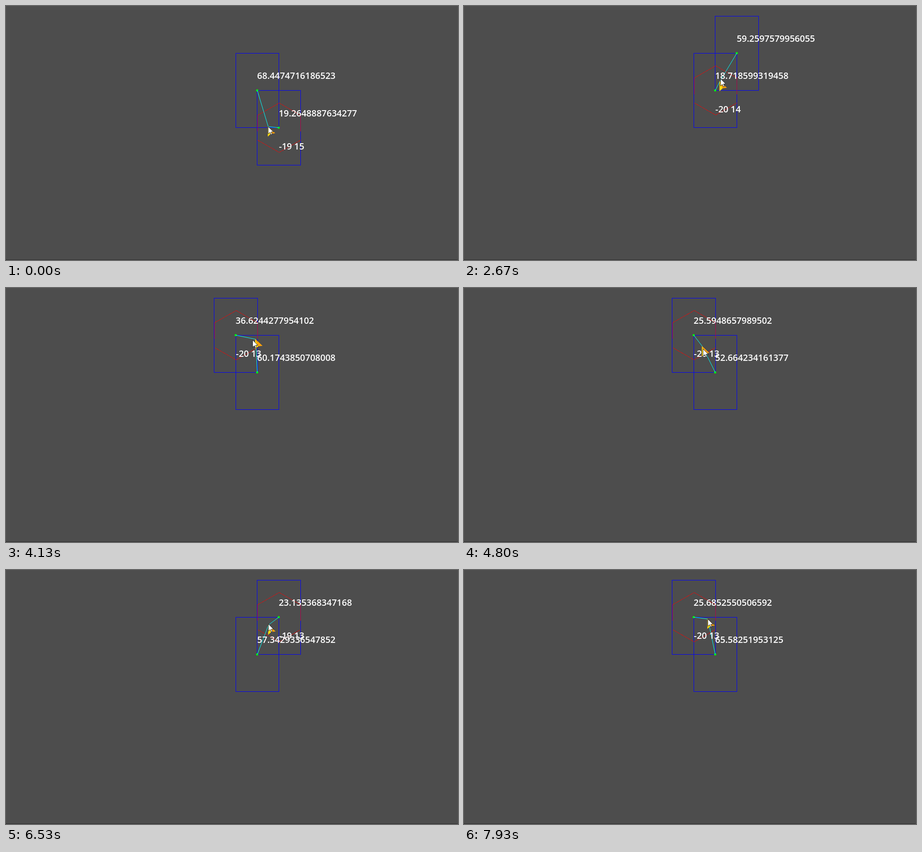
Recreate the animation shown at these times as an HTML page. Size 998 px wide and 561 px high, loop 8 s.

```html
<!DOCTYPE html>
<html lang="en">
<head>
<meta charset="utf-8">
<title>Hex grid picking</title>
<style>
  html, body { margin: 0; width: 100%; height: 100%; overflow: hidden; background: #4d4d4d; }
  svg { display: block; width: 998px; height: 561px; }
  text { font: 600 19.57px "Open Sans", "Noto Sans", sans-serif; fill: #fff; }
  .box, .hex { fill: none; shape-rendering: crispEdges; }
  .box { stroke: #00f; }
  .hex { stroke: #f00; stroke-opacity: .7; }
  .link { fill: none; stroke: #0ff; }
  .dot { fill: #0f0; }
</style>
</head>
<body>
<svg viewBox="0 0 998 561">
  <rect width="998" height="561" fill="#4d4d4d"/>
  <path d="M0 560H998V561H0ZM0 558.5L2 561H0ZM998 558.5L996 561H998Z" fill="#2c2c2c"/>
  <rect class="box"/><rect class="box"/>
  <path class="hex" id="hex"/>
  <circle class="dot" r="2.4"/><circle class="dot" r="2.4"/>
  <path class="link" id="link"/>
  <text class="dist"></text><text class="dist"></text>
  <text id="name"></text>
  <g id="arrow">
    <path d="M-1-1V22L6 15.5Z" fill="#ffd90f"/>
    <path d="M-1-1L15.4 14.6L6 15.5Z" fill="#ffa20a"/>
  </g>
  <path id="cursor" d="M0 0V16L4 12.5L6.4 18L8.8 17L6.5 11.7H11.5Z"
        fill="#fff" stroke="#111" stroke-width=".9"/>
</svg>
<script>
const LOOP = 8000, STEP = 1000 / 15, LAST = 119, LEAD = 2;
const S = 1.2195, R = 45 * S, W = R * Math.sqrt(3), ROW = 1.5 * R;
const OX = 554.82, OY = 186.5;          // centre of cell -20 14

const $ = id => document.getElementById(id);
const all = name => document.querySelectorAll('.' + name);
const boxes = all('box'), dots = all('dot'), dists = all('dist');
const set = (el, attrs) => { for (const a in attrs) el.setAttribute(a, attrs[a]); };
const snap = v => Math.floor(v + .15);

const shift = r => r % 2 ? .5 : 0;
const cell = (c, r) => ({ c, r, x: OX + (c + 20 - shift(r)) * W, y: OY + (r - 14) * ROW });
const mid = cell(-20, 14), low = cell(-19, 15), right = cell(-19, 13), left = cell(-20, 13);

// Point at the given distances from two cells; side picks one of the two solutions
function meet(a, b, da, db, side = 1) {
  const dx = b.x - a.x, dy = b.y - a.y, d = Math.hypot(dx, dy);
  const p = da * S, q = db * S;
  const u = (p * p - q * q + d * d) / (2 * d);
  const h = side * Math.sqrt(Math.max(0, p * p - u * u));
  return { x: a.x + (dx * u - dy * h) / d, y: a.y + (dy * u + dx * h) / d };
}

// Turning points of the pointer, by step
const path = [
  { k: 16, ...meet(mid, low, 68.4474716186523, 19.2648887634277) },
  { k: 25, ...meet(mid, low, 35.3637466430664, 45.059154510498) },
  { k: 40, ...meet(right, mid, 59.2597579956055, 18.718599319458) },
  { k: 52, ...meet(right, mid, 31.9123001098633, 46.0349349975586) },
  { k: 61, x: 554, y: 113 },
  { k: 72, ...meet(left, mid, 25.5948657989502, 52.664234161377, -1) },
  { k: 80, x: 541, y: 151 },
  { k: 98, ...meet(right, mid, 23.135368347168, 57.3429336547852) },
  { k: 107, x: 572, y: 112 },
  { k: 113, x: 556, y: 97 },
  { k: 119, ...meet(left, mid, 25.6852550506592, 65.58251953125, -1) }
];

// Monotone cubic through the turning points
const slope = (a, b, n) => (b[n] - a[n]) / (b.k - a.k);
function tangent(i, n) {
  if (!path[i - 1] || !path[i + 1]) return 0;
  const a = slope(path[i - 1], path[i], n), b = slope(path[i], path[i + 1], n);
  return a * b > 0 ? 2 * a * b / (a + b) : 0;
}
function mouse(k) {
  const i = Math.max(0, path.findLastIndex(p => p.k <= k));
  const a = path[i], b = path[i + 1];
  if (!b || k <= a.k) return [a.x, a.y];
  const len = b.k - a.k, u = (k - a.k) / len, ease = u * u * (3 - 2 * u);
  return ['x', 'y'].map(n => a[n] + (b[n] - a[n]) * ease
    + len * u * (1 - u) * ((1 - u) * tangent(i, n) - u * tangent(i + 1, n)));
}

// Cell of one row parity whose box holds the point
function pick(x, y, odd) {
  const r = 14 - odd + 2 * Math.round(((y - OY) / ROW + odd) / 2);
  return cell(Math.round((x - OX) / W + shift(r)) - 20, r);
}

function drawHex({ c, r, x, y }) {
  const x0 = Math.ceil(x - W / 2) + .5, x1 = Math.round(x + W / 2) + .5;
  const cx = x + 1, h = R / 2, end = y + 8;
  $('hex').setAttribute('d',
    `M${x0} ${end}V${y - h}L${cx} ${y - R + .4}L${x1} ${y - h}V${end}` +
    `M${x0} ${y + h}L${cx} ${y + R - .4}L${x1} ${y + h}`);
  set($('name'), { x: x + .3, y: y + 40 * S - .6 });
  $('name').textContent = `${c} ${r}`;
}

function draw(k) {
  const [x, y] = mouse(k), [px, py] = mouse(k + LEAD);
  const cells = [pick(x, y, 0), pick(x, y, 1)];
  const len = cells.map(c => Math.hypot(x - c.x, y - c.y) / S);

  cells.forEach((c, i) => {
    const x0 = snap(c.x - W / 2), y0 = snap(c.y - ROW);
    set(boxes[i], {
      x: x0 + .5, y: y0 + .5,
      width: Math.round(c.x + W / 2) - x0, height: snap(c.y + ROW) - y0
    });
    set(dots[i], { cx: c.x - .2, cy: c.y });
    set(dists[i], { x: c.x - .2, y: c.y - 20 * S - .7 });
    dists[i].textContent = parseFloat(Math.fround(len[i]).toPrecision(15));
  });
  drawHex(cells[len[0] < len[1] ? 0 : 1]);

  const [a, b] = cells;
  $('link').setAttribute('d', `M${a.x} ${a.y}L${x} ${y}L${b.x} ${b.y}`);
  $('arrow').setAttribute('transform', `translate(${x} ${y})`);
  $('cursor').setAttribute('transform', `translate(${px} ${py})`);
}

const began = performance.now();
function tick() {
  const t = (performance.now() - began) % LOOP;
  draw(Math.min(LAST, Math.floor((t + 4) / STEP)));
  requestAnimationFrame(tick);
}
tick();
</script>
</body>
</html>
```
